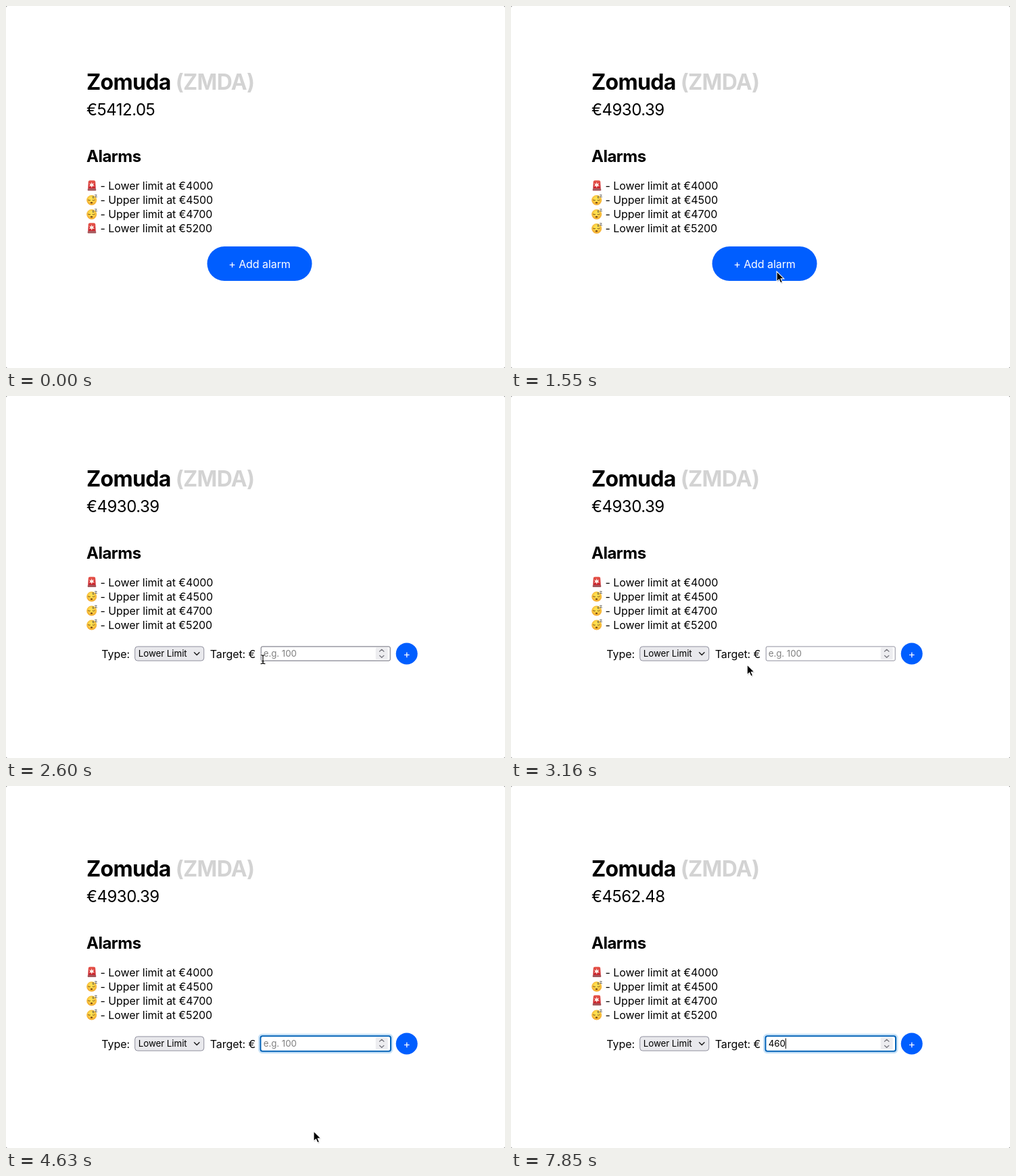
Recreate the animation shown at these times as an HTML page. Size 738 by 536 pixels, loop 7.99 s.

```html
<!DOCTYPE html>
<html lang="en">
<head>
<meta charset="utf-8">
<title>Price alarms</title>
<style>
  html, body { margin: 0; width: 100%; height: 100%; overflow: hidden; background: #fff; }
  svg { display: block; width: 738px; height: 536px; }
  text { font: 16px Inter, sans-serif; letter-spacing: -.004em; white-space: pre; }
  .title, .price, .heading { letter-spacing: -.021em; }
  .title { font-size: 32px; font-weight: 700; }
  .price { font-size: 24px; }
  .heading { font-size: 24px; font-weight: 700; }
  .control { font-size: 13.333px; }
  .light { fill: #fff; }
  .mid { text-anchor: middle; }
  .line { fill: none; stroke-linecap: round; stroke-linejoin: round; }
</style>
</head>
<body>
<svg viewBox="0 0 738 536">
  <defs>
    <radialGradient id="skin" cx=".5" cy=".4" r=".6">
      <stop offset=".3" stop-color="#ffe04f"/>
      <stop offset="1" stop-color="#f2a52c"/>
    </radialGradient>
    <linearGradient id="dome" x2="0" y2="1">
      <stop offset="0" stop-color="#e8584c"/>
      <stop offset="1" stop-color="#c9202a"/>
    </linearGradient>
    <g id="siren">
      <path d="M-5.7 4.5-5.2-5.8Q-5-7.8-3-7.8H3Q5-7.8 5.2-5.8L5.7 4.5Z" fill="url(#dome)"/>
      <path d="M-.3-5.4.6-2.6 3.4-3.8 1.8-1.2 4 1 .8.6-.2 3.2-1.4.6-4 1.2-2.4-1.2-4-3.6-1.2-2.6Z" fill="#fff0ea"/>
      <path d="M-6 4.2H6L6.3 6.6Q6.3 7.6 5.3 7.6H-5.3Q-6.3 7.6-6.3 6.6Z" fill="#a4565a"/>
    </g>
    <g id="sleepy">
      <circle cx="-.3" cy=".5" r="7.5" fill="url(#skin)"/>
      <path class="line" d="M-5.6.2Q-4 1.5-2.4.6M1 .6Q2.6 1.5 4.2.2" stroke="#6d4818" stroke-width=".9"/>
      <ellipse cx="-.5" cy="4.3" rx="1.6" ry="1.3" fill="#7a4a18"/>
      <path class="line" d="M4.4-7.2H7.2L4.8-4.2H7.6M.8-5H2.8L1-2.8H3" stroke="#55524c" stroke-width=".8"/>
    </g>
  </defs>

  <rect width="738" height="536" fill="#777"/>
  <rect width="738" height="536" rx="2.5" fill="#fff"/>

  <g id="info">
    <text class="title" x="119" y="124">Zomuda <tspan fill="#d3d3d3">(ZMDA)</tspan></text>
    <text class="price" id="price" x="119" y="162"></text>
    <text class="heading" x="119" y="231">Alarms</text>
    <g id="alarms"></g>
  </g>

  <g id="add">
    <rect x="297.5" y="356" width="155" height="51" rx="25.5" fill="#005eff"/>
    <text class="light mid" x="375" y="388">+ Add alarm</text>
  </g>

  <g id="form" transform="translate(-.3 -.5)">
    <text x="141.5" y="388">Type:</text>
    <rect x="191" y="371.5" width="102" height="21" rx="4" fill="#e9e9ed" stroke="#8f8f9d"/>
    <text class="control" x="196" y="386.5">Lower Limit</text>
    <path class="line" d="M278.8 380.2 282.5 384 286.2 380.2" stroke="#222" stroke-width="1.5"/>
    <text x="302" y="388">Target: €</text>
    <rect id="field" x="377.5" y="371.5" width="191" height="21" rx="2" fill="#fff"/>
    <g id="focus" fill="none">
      <rect x="374.5" y="368.5" width="197" height="27" rx="5" stroke="#c9e3f8" stroke-width="2.5"/>
      <rect x="376.7" y="370.7" width="192.6" height="22.6" rx="3" stroke="#0062b8" stroke-width="2"/>
    </g>
    <rect x="547" y="373" width="18" height="17.5" rx="1.5" fill="#ededf0"/>
    <path class="line" d="M552.8 378.8 556 375.8 559.2 378.8M552.8 384.8 556 387.8 559.2 384.8" stroke="#77777f" stroke-width="1.2"/>
    <text class="control" id="value" x="381" y="386.5"></text>
    <rect id="caret" y="374" width="1" height="15.5"/>
    <circle cx="593" cy="382" r="16" fill="#005eff"/>
    <text class="light mid" x="593" y="388">+</text>
  </g>

  <g id="arrow">
    <path d="M0 0V15L3.4 11.9 5.8 17.2 8.4 16 6.1 10.9H10.8Z" fill="#0003" transform="translate(.6 1.2)"/>
    <path d="M0 0V15L3.4 11.9 5.8 17.2 8.4 16 6.1 10.9H10.8Z" stroke="#fff" stroke-width="1.1"/>
  </g>
  <g id="beam" class="line">
    <path d="M-3-6.5Q0-6.5 0-4.5Q0-6.5 3-6.5M0-4.5V4.5M-3 6.5Q0 6.5 0 4.5Q0 6.5 3 6.5M-1.5 2.5H1.5" stroke="#fff" stroke-width="2.6"/>
    <path d="M-3-6.5Q0-6.5 0-4.5Q0-6.5 3-6.5M0-4.5V4.5M-3 6.5Q0 6.5 0 4.5Q0 6.5 3 6.5M-1.5 2.5H1.5" stroke="#000" stroke-width="1.2"/>
  </g>
</svg>
<script>
const LOOP = 7990, STEP = 70, START = 500;
const FORM_AT = 2600, FOCUS_AT = 4210, TYPE_AT = 7360;
const $ = id => document.getElementById(id);

// Each list holds [time, value]; the latest entry reached applies.
const prices = [[0, 5412.05], [780, 4930.39], [5750, 4562.48]];
const typed = [[0, ''], [TYPE_AT, '4'], [7570, '46'], [7850, '460']];
const carets = [[0, 0], [FOCUS_AT, 1], [4630, 0], [5190, 1], [5750, 0], [6380, 1], [6940, 0], [TYPE_AT, 1]];
const limits = [['Lower', 4000], ['Upper', 4500], ['Upper', 4700], ['Lower', 5200]];

// Pointer path: time, x, y.
const path = [
  [500, 428, 528], [1060, 436, 421], [1130, 436, 421], [1550, 393, 393],
  [2180, 393, 393], [2460, 403, 402], [2530, 403, 402], [2600, 380, 390],
  [2740, 380, 390], [3020, 356, 411], [3370, 339, 378], [3650, 339, 378],
  [3720, 342, 376], [3860, 404, 379], [3930, 404, 379], [4070, 412, 381],
  [4350, 412, 381], [4630, 455, 511], [LOOP, 455, 511]
];

const latest = (list, t) => list.filter(([at]) => at <= t).pop()[1];
const show = (id, on) => $(id).setAttribute('display', on ? 'inline' : 'none');
const move = (id, x, y) => $(id).setAttribute('transform', `translate(${x} ${y})`);

$('alarms').innerHTML = limits.map(([kind, limit], i) =>
  `<use id="icon${i}" x="127" y="${266 + 21 * i}"/>
   <text x="139.5" y="${272 + 21 * i}">- ${kind} limit at €${limit}</text>`).join('');

// Alarm states by row: the third and fourth switch with the price.
const ringing = price => [true, false, price < 4700, price > 5200];

function pointerAt(t) {
  const i = path.findIndex(([at]) => at > t);
  const [t0, x0, y0] = path[i - 1], [t1, x1, y1] = path[i];
  const k = (t - t0) / (t1 - t0);
  return [x0 + (x1 - x0) * k, y0 + (y1 - y0) * k];
}

function drawPointer(t) {
  const visible = t >= START && t < TYPE_AT;
  let overField = false;
  if (visible) {
    const [x, y] = pointerAt(t);
    overField = t >= FORM_AT && x >= 377 && x <= 569 && y >= 371 && y <= 393;
    move(overField ? 'beam' : 'arrow', x, y);
  }
  show('arrow', visible && !overField);
  show('beam', visible && overField);
  const focused = t >= FOCUS_AT;
  $('field').setAttribute('stroke', focused ? 'none' : overField ? '#676774' : '#8f8f9d');
}

function draw() {
  const now = performance.now() % LOOP;
  const t = now < START ? 0 : START + Math.floor((now - START) / STEP) * STEP;
  const price = latest(prices, t), entry = latest(typed, t);
  const open = t >= FORM_AT;

  $('price').textContent = '€' + price.toFixed(2);
  ringing(price).forEach((on, i) => $('icon' + i).setAttribute('href', on ? '#siren' : '#sleepy'));
  move('info', 0, open ? 9.5 : 0);
  show('add', !open);
  show('form', open);
  show('focus', t >= FOCUS_AT);
  show('caret', latest(carets, t));

  const value = $('value');
  value.textContent = entry || 'e.g. 100';
  value.setAttribute('fill', entry ? '#000' : '#808080');
  $('caret').setAttribute('x', 381 + (entry && open ? value.getComputedTextLength() : 0));
  drawPointer(t);
  requestAnimationFrame(draw);
}
draw();
</script>
</body>
</html>
```
